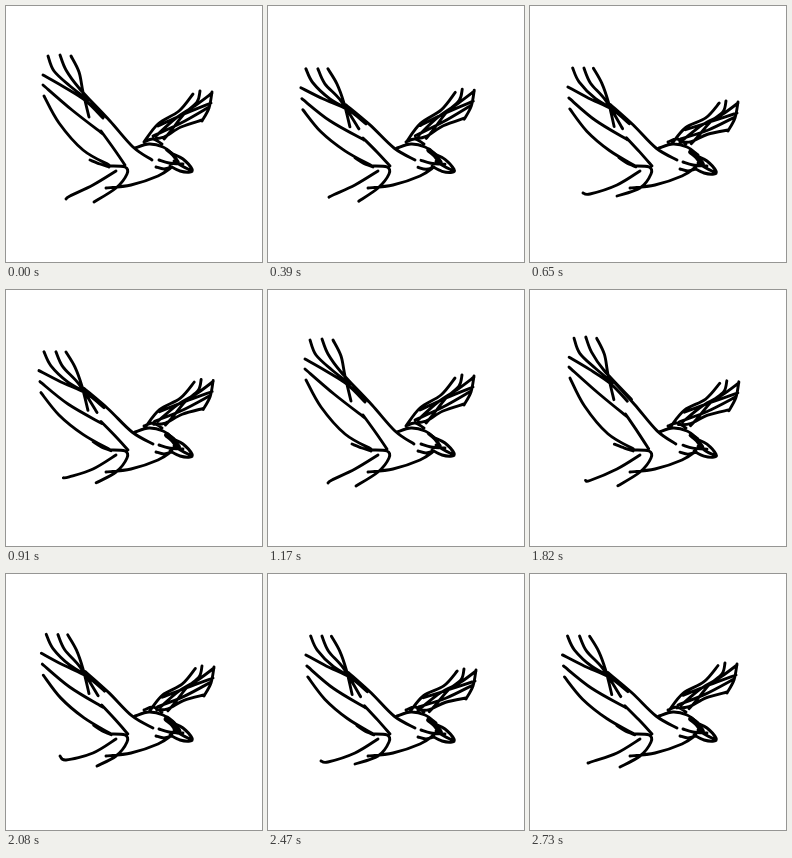
Animation of 256 by 256 pixels, one loop 2.86 s. Source, as an HTML page:

```html
<!DOCTYPE html>
<html lang="en">
<head>
<meta charset="utf-8">
<title>Flying bird</title>
<style>
  html, body { margin: 0; width: 100%; height: 100%; overflow: hidden; background: #fff; }
  svg { display: block; width: 100vw; height: 100vh; }
  path { fill: none; stroke: #000; stroke-linecap: round; stroke-linejoin: round; }
</style>
</head>
<body>
<svg viewBox="0 0 256 256"><path id="ink" stroke-width="2.9"/><path id="eye"/></svg>
<script>
const STEP = 130, COUNT = 22;

// Strokes are points joined smoothly: "x y,x y,..."
const parse = s => s.split(',').map(p => p.split(' ').map(Number));

// Left wing: each stroke raised, then lowered.
const leftWing = [
  ['42 50,48 65,64 80,82 94', '38 63,45 77,62 93,82 104'],
  ['54 49,60 64,73 82,100 111', '50 63,57 78,73 95,91 123'],
  ['65 50,73 66,77 86,83 111', '60 63,69 78,76 97,82 121'],
  ['37 69,58 81,80 95,97 112', '33 82,55 93,80 104,98 118'],
  ['82 92,104 115,127 141,146 154', '78 99,102 119,126 142,147 154'],
  ['37 79,66 104,97 128', '34 93,62 115,96 134'],
  ['95 125,108 143,119 159', '95 132,109 146,122 160'],
  ['38 90,53 117,77 144,103 159', '35 104,53 126,77 145,104 160'],
  ['84 154,94 158,103 161', '87 152,95 157,105 161']
].map(pair => pair.map(parse));

const rightWing = [
  '138 136,152 118,173 105,187 88',
  '194 85,191 96,178 108,164 126,158 133',
  '206 86,203 102,196 115',
  '196 114,175 121,158 131,146 133',
  '152 120,178 108,205 97',
  '147 130,175 117,203 101',
  '206 87,190 99,170 112,150 130'
].map(parse);

const body = [
  '100 182,125 179,152 170,166 161',
  '129 142,143 138,157 141,168 149',
  '138 136,147 133,156 138'
].map(parse);

const head = [
  '167 148,177 153,186 163,184 166,174 165,164 160',
  '150 161,158 163,166 161',
  '153 154,163 157,177 158',
  '168 155,176 160,184 164'
].map(parse);

// phase, left raise/dx/dy, right dx/dy, root shift, shin x/y, foot x/y, tail x/y, head dy, eye weight
const poses = [
  [0,    0,    0,   0,  0,   0,  0, 64, 190, 60, 193, 88, 196, 0, 3.5],
  [.17, -.35,  1,   0,  3,   5,  2, 60, 191, 56, 191, 88, 197, 1, 4.5],
  [.35,  1,    4.5, -1, 2,  10,  4, 60, 188, 53, 187, 87, 190, 2, 5.5],
  [.55,  .95,  2,   -2, 2,   7,  5, 60, 186, 54, 182, 91, 192, 1, 6.5],
  [.7,   1,   -.5,  -1, 1,   4,  1, 64, 187, 58, 189, 90, 193, 1, 5.5],
  [.85,  1,    0,   0,  0,  -4,  0, 67, 189, 62, 192, 91, 196, 0, 5]
];
poses.push([1, ...poses[0].slice(1)]);

// Flap progress: frame index, wingbeats so far
const beats = [[0, 0], [5, 1.35], [9, 2], [12, 2.85], [16, 3.55], [19, 4.35], [21, 4.7], [22, 5]];

const mix = (a, b, k) => a + (b - a) * k;

function sample(keys, at) {
  const i = Math.max(1, keys.findIndex(k => k[0] > at));
  const a = keys[i - 1], b = keys[i];
  const k = (at - a[0]) / (b[0] - a[0]);
  return a.map((v, j) => mix(v, b[j], k));
}

function curve(pts) {
  const at = i => pts[Math.min(pts.length - 1, Math.max(0, i))];
  let d = 'M' + pts[0];
  for (let i = 0; i < pts.length - 1; i++) {
    const [p, a, b, q] = [at(i - 1), at(i), at(i + 1), at(i + 2)];
    const c1 = a.map((v, j) => v + (b[j] - p[j]) / 6);
    const c2 = b.map((v, j) => v - (q[j] - a[j]) / 6);
    d += `C${c1} ${c2} ${b}`;
  }
  return d;
}

const ink = document.getElementById('ink');
const eye = document.getElementById('eye');

function draw(ms) {
  const frame = Math.floor(ms / STEP) % COUNT;
  const phase = sample(beats, frame)[1] % 1;
  const [, raise, ldx, ldy, rdx, rdy, root, kx, ky, fx, fy, tx, ty, hy, weight] = sample(poses, phase);

  const left = leftWing.map(([up, down]) => up.map((p, i) => {
    const x = mix(p[0], down[i][0], raise), y = mix(p[1], down[i][1], raise);
    const reach = Math.max(0, (120 - x) / 80);
    return [x + ldx * reach, y + ldy * reach];
  }));
  const right = rightWing.map(s => s.map(([x, y]) => {
    const reach = Math.min(1, Math.max(0, (x - 138) / 55));
    return [x + mix(root, rdx, reach), y + mix(root * .4, rdy, reach)];
  }));
  const legs = [
    [[104, 160], [119, 161], [121, 168], [110, 182], [tx, ty]],
    [[110, 165], [87, 179], [kx, ky], [fx, fy]]
  ];
  const face = head.map(s => s.map(([x, y]) => [x, y + hy]));

  ink.setAttribute('d', [...left, ...right, ...legs, ...body, ...face].map(curve).join(''));
  eye.setAttribute('d', curve([[161, 144 + hy], [167, 149 + hy], [172, 156 + hy]]));
  eye.setAttribute('stroke-width', weight);
}

let start;
function tick(now) {
  start ??= now;
  draw(Math.max(0, now - start));
  requestAnimationFrame(tick);
}
draw(0);
requestAnimationFrame(tick);
</script>
</body>
</html>
```
